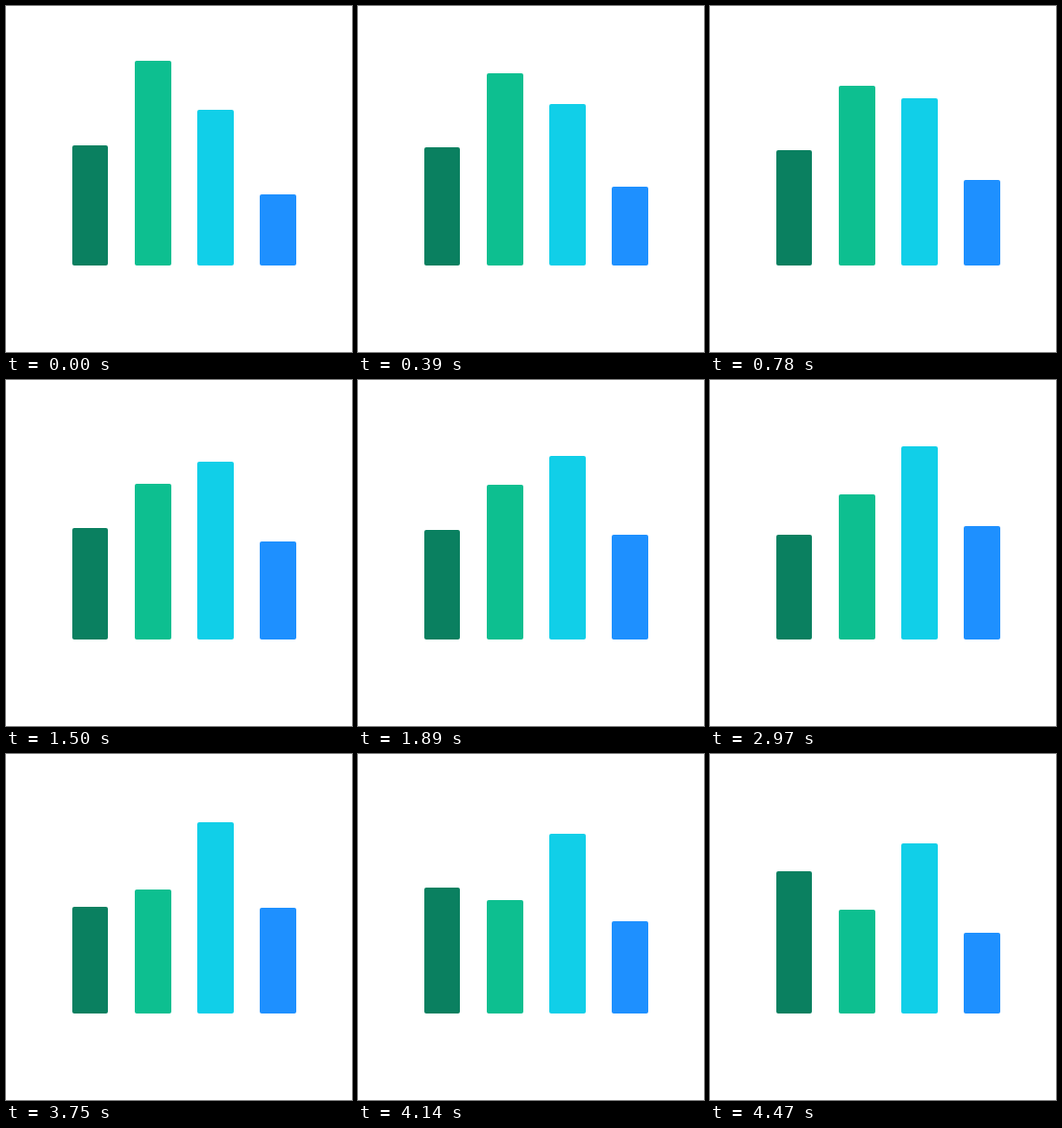
Recreate the animation shown at these times as an HTML page. Size 360 by 360 pixels, loop 4.5 s.

```html
<!DOCTYPE html>
<html lang="en">
<head>
<meta charset="utf-8">
<title>Bars</title>
<style>
  html, body { margin: 0; width: 100%; height: 100%; overflow: hidden; background: #fff; }
  svg { display: block; width: 100%; height: 100%; }
</style>
</head>
<body>
<svg viewBox="0 0 360 360"></svg>
<script>
const LOOP = 4500, STEP = 30, LAST = LOOP - STEP, PAUSE = 1110;
const LEFT = 69, PITCH = 65.1, WIDTH = 37.45, BASE = 270;

// Tops at the start, during the pause and at the end; `arrive` begins the pause
const bars = [
  { color: '#0a8060', from: 145, rest: 160.8, to: 122, arrive: 2600 },
  { color: '#0dbf90', from: 56.5, rest: 108.6, to: 162, arrive: 1510 },
  { color: '#11cfe8', from: 108, rest: 69, to: 93, arrive: 2570 },
  { color: '#1e90ff', from: 195.6, rest: 151.5, to: 185.6, arrive: 2400 },
];

const svg = document.querySelector('svg');

function setAttrs(node, attrs) {
  for (const name in attrs) node.setAttribute(name, attrs[name]);
}

bars.forEach((bar, i) => {
  const left = LEFT + PITCH * i, x = Math.round(left);
  bar.rect = document.createElementNS('http://www.w3.org/2000/svg', 'rect');
  setAttrs(bar.rect, { x, width: Math.round(left + WIDTH) - x, rx: 2, fill: bar.color });
  svg.append(bar.rect);
});

// Linear progress between two times, held at 0 and 1 outside them
const progress = (time, start, end) =>
  Math.min(1, Math.max(0, (time - start) / (end - start)));

function topAt({ from, rest, to, arrive }, time) {
  return from + (rest - from) * progress(time, 0, arrive)
    + (to - rest) * progress(time, arrive + PAUSE, LAST);
}

function draw() {
  const time = Math.floor(performance.now() % LOOP / STEP) * STEP;
  for (const bar of bars) {
    const y = Math.round(topAt(bar, time));
    setAttrs(bar.rect, { y, height: BASE - y });
  }
  requestAnimationFrame(draw);
}
draw();
</script>
</body>
</html>
```
